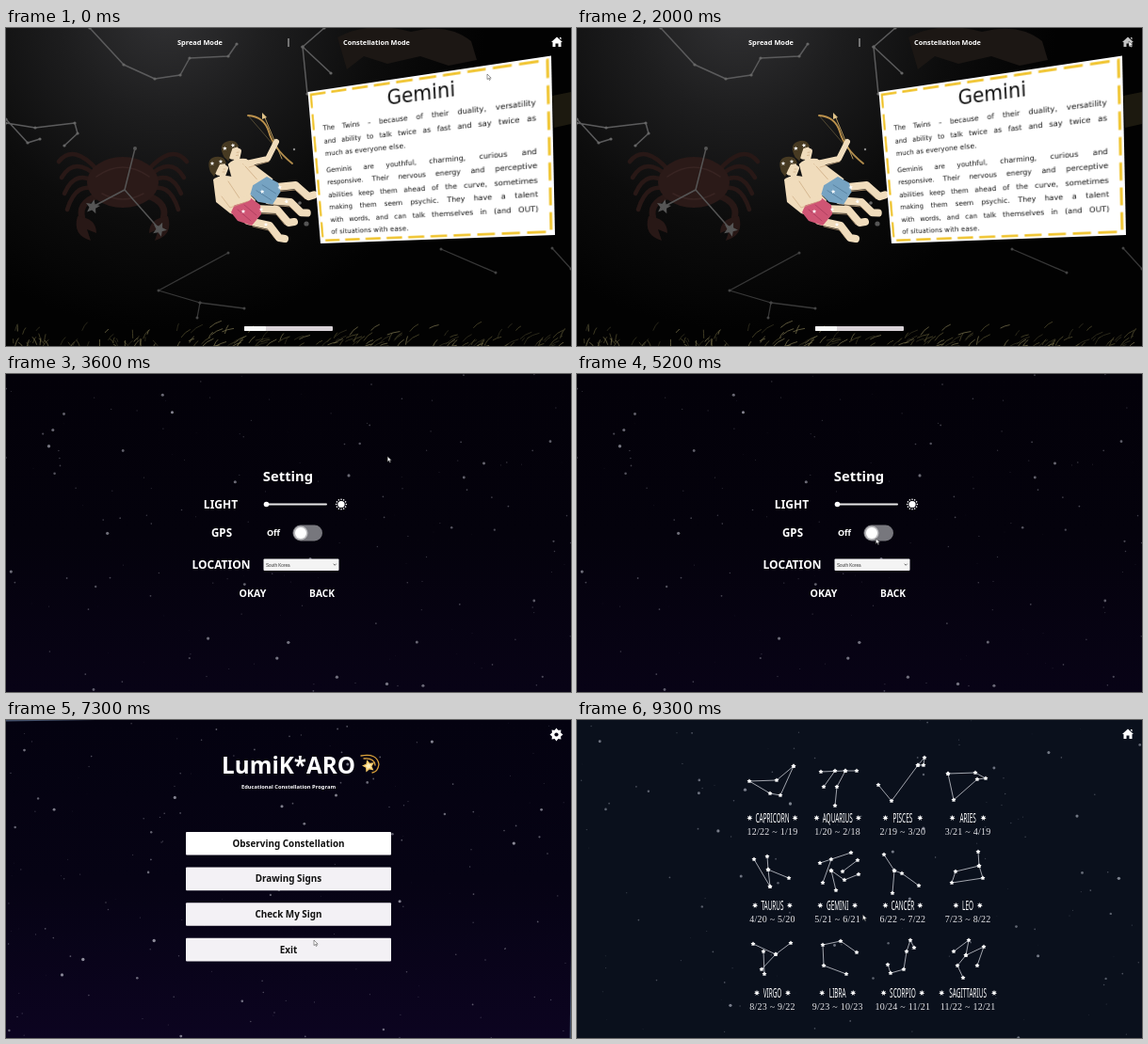
Write an HTML page that moves like this. It is 600 px wide and 338 px high and loops after 9400 ms.

```html
<!DOCTYPE html>
<html lang="en">
<head>
<meta charset="utf-8">
<title>Constellation program</title>
<style>
html, body { margin: 0; width: 100%; height: 100%; overflow: hidden; background: #000; }
#stage { position: absolute; left: 0; top: 0; width: 600px; height: 338px; overflow: hidden; }
svg { position: absolute; left: 0; top: 0; }
text { font-family: "Noto Sans", "Open Sans", sans-serif; text-anchor: middle; fill: #fff; font-weight: 700; }
.label { font-weight: 400; }
.date { font: 10px "Liberation Serif", serif; letter-spacing: .25px; fill: #e4e4e8; }
.small { font: 4.6px "Liberation Sans", sans-serif; fill: #333; text-anchor: start; }
#card { position: absolute; left: 0; top: 0; width: 258px; height: 176px; background: #fff; color: #111;
  font-family: "DejaVu Sans", sans-serif; transform-origin: 0 0; }
#card div { position: absolute; left: 15px; width: 228px; font-size: 7.7px; line-height: 14px; text-align: justify; text-align-last: justify; }
#card div.last { text-align-last: left; letter-spacing: .15px; }
#card div.head { top: 2px; font-size: 20.5px; line-height: 34px; text-align-last: center; }
</style>
</head>
<body>
<div id="stage"></div>
<script>
const LOOP = 9400;
const stage = document.getElementById('stage');
const $ = id => document.getElementById(id);
const clamp = v => Math.max(0, Math.min(1, v));

function rng(seed) {
  return () => (seed = (seed * 16807) % 2147483647) / 2147483647;
}
const text = (s, x, y, size, extra = '') =>
  `<text x="${x}" y="${y}" font-size="${size}" ${extra}>${s}</text>`;
const line = (d, color, width) =>
  `<path d="${d}" fill="none" stroke="${color}" stroke-width="${width}" stroke-linecap="round" stroke-linejoin="round"/>`;
const shape = (d, color) => `<path d="${d}" fill="${color}"/>`;
const dot = (x, y, r, color, o = 1) =>
  `<circle cx="${x}" cy="${y}" r="${r}" fill="${color}" opacity="${o}"/>`;
const oval = (x, y, rx, ry, color) =>
  `<ellipse cx="${x}" cy="${y}" rx="${rx}" ry="${ry}" fill="${color}"/>`;
const box = (x, y, w, h, color, extra = '') =>
  `<rect x="${x}" y="${y}" width="${w}" height="${h}" fill="${color}" ${extra}/>`;
const group = (transform, s) => `<g transform="${transform}">${s}</g>`;

function star(x, y, r, color, n = 5, inner = .45, turn = 0) {
  let p = '';
  for (let i = 0; i < 2 * n; i++) {
    const a = i * Math.PI / n - Math.PI / 2 + turn, q = i % 2 ? r * inner : r;
    p += (x + q * Math.cos(a)).toFixed(2) + ',' + (y + q * Math.sin(a)).toFixed(2) + ' ';
  }
  return `<polygon points="${p}" fill="${color}"/>`;
}

// Draw a mark at every corner of a path
const corners = (d, mark) => d.match(/\d+ \d+/g).map(p => mark(...p.split(' ').map(Number))).join('');

// Many faint specks and a few larger soft stars
function sky(seed, color, many, few) {
  const rand = rng(seed);
  let out = '';
  for (let i = 0; i < many + few; i++) {
    const big = i >= many, v = rand();
    out += dot((rand() * 600).toFixed(1), (rand() * 338).toFixed(1), (big ? 1.1 + v * .6 : .4 + v * .5).toFixed(2),
      color, (big ? .45 + v * .3 : .15 + v * .3).toFixed(2));
  }
  return out;
}

const home = id => `<path id="${id}" fill="#fff" d="M585 9.5L591 15H589.5V20H586.5V16.5H583.5V20H580.5V15H579ZM588 10H589.5V12.5L588 11Z"/>`;

// Card scene
function crab() {
  const red = '#281816';
  let half = line('M26 14Q50 22 42 42', red, 7) + shape('M48 36Q54 56 34 62L38 50 28 54Q28 38 48 36Z', red);
  for (let i = 0; i < 4; i++)
    half += line(`M26 ${i * 7 - 12}Q${52 - i} ${i * 13 - 42} ${68 - i * 3} ${i * 17 - 22}`, red, 4.5);
  const points = 'M92 190L126 172 163 214M126 172L137 128';
  return group('translate(124 164)', half + group('scale(-1 1)', half) + oval(0, 0, 38, 27, '#2b1a18') +
    line('M-28 -6Q0 -26 28 -6M-22 12Q0 24 22 12', '#382422', 1.5)) +
    line(points, '#555', 1.5) + star(92, 190, 8, '#555', 5, .45, .2) + star(163, 214, 8, '#555', 5, .45, .4) + dot(137, 128, 2, '#555');
}

const skin = '#f0dcbc', shade = '#cfae86';
// One seated figure, head at 0,0
function figure(cloth, dark) {
  return line('M37 43L62 44 74 58 80 57M31 56L54 61 64 74 70 75', skin, 8) +
    line('M42 48L61 49 70 60M36 62L53 66 60 75', shade, .7) +
    shape('M-6 12Q2 6 14 9L39 34 30 54 12 48 -3 36Z', skin) +
    shape('M17 38L33 31 44 39 45 49 35 61 20 56 13 47Z', cloth) +
    line('M20 44L34 56M27 39L40 50', dark, .8) +
    line('M4 8L7 0', skin, 6) + oval(1, 0, 7, 8, skin) +
    shape('M-9 4Q-14 -10 -4 -12 6 -14 8 -5L1 -4 -2 2 -5 9Z', '#473a22') +
    line('M5 1H7M4 4H6M10 14L22 32', shade, .8) +
    [[-7, -5], [2, -7], [26, 46], [45, 44], [50, 60]].map(([x, y]) => star(x, y, 2.4, '#fff')).join('');
}
const twins = line('M257 93Q274 94 279 110 284 128 304 144', '#bd924c', 1.8) +
  line('M257 93L289 130 304 144', '#8f7c50', .5) + line('M293 139L274 93', '#c9a766', .9) + shape('M272 90L277 95 272 97Z', '#dfc288') +
  group('translate(240 132) rotate(-8)', figure('#76a3c2', '#557f9e')) +
  line('M255 144L278 139 287 121', skin, 6) + line('M258 148L279 142', shade, .7) +
  group('translate(226 149)', figure('#cf5574', '#a93c5c') + line('M0 20L11 38 31 32', skin, 6) + line('M3 30L12 42 31 35', shade, .7)) +
  dot(312, 186, 1.8, '#666') + dot(319, 208, 2.6, '#555') + dot(306, 129, 1.2, '#888');

const paths = 'M89 0L125 39 158 54 185 50 195 32 236 30 245 17M0 97L23 122 36 118M0 101L31 106 73 101 76 112 62 125M320 70L315 20 338 0M315 20L345 48';
const lowPaths = 'M236 239L162 279 206 292 253 298M206 292L203 308M462 235L520 260M580 234L600 256';
const cardScene = box(0, 0, 600, 338, 'url(#night)') +
  shape('M352 10Q385 -8 430 4 470 -6 494 14L500 34 470 40 440 30 405 38 380 30 362 44Z', '#1c1714') +
  shape('M580 72L600 68V102L582 106Z', '#1c190f') +
  line(paths, '#5b5b5c', 1.5) + corners(paths, (x, y) => dot(x, y, 1.6, '#666')) +
  line(lowPaths, '#383838', 1.3) + corners(lowPaths, (x, y) => dot(x, y, 1.5, '#444')) +
  crab() + twins + '<g id="grass"></g>' +
  box(253, 317, 94, 5, '#d8d2d7', 'rx="1"') + box(253, 317, 23, 5, '#f8f8f8', 'rx="1"') +
  text('Spread Mode', 206, 18, 7.4) + text('Constellation Mode', 393.5, 18, 7.3) +
  box(299.5, 11, 1, 9, '#ccc') + home('home');

// Menu scene
const buttons = ['Observing Constellation', 'Drawing Signs', 'Check My Sign', 'Exit'];
const gear = star(584.5, 15.5, 7, '#fff', 8, .7) + dot(584.5, 15.5, 5, '#fff') + dot(584.5, 15.5, 2.1, '#0a0716');
const menuScene = box(0, 0, 600, 338, 'url(#violet)') + sky(77, '#bdbdc9', 150, 34) +
  shape('M0 0H95L0 1.4ZM600 245V338H598.6Z', '#43506a') +
  text('LumiK*ARO', 300, 56.5, 24.2) + text('Educational Constellation Program', 300, 72.5, 5.75, 'style="font-weight:600"') +
  line('M377 38Q394 35 396 47 395 55 389 56M380 41Q391 40 392 48', '#d9a13b', 1.3) +
  star(385, 49, 7, '#f4c867', 5, .5, -.25) + star(385, 49, 3.8, '#fff0bd', 5, .5, -.25) +
  buttons.map((s, i) => box(191, 119 + i * 37.6, 218, 24.6, i ? '#f3f1f5' : '#fff', `rx="1" id="btn${i}"`) +
    text(s, 300, 134.8 + i * 37.6, 9.9, 'style="fill:#111"')).join('') + gear;

// Settings scene
let sun = dot(356, 138.5, 3.6, '#fff');
for (let i = 0; i < 12; i++)
  sun += group(`rotate(${i * 30} 356 138.5)`, dot(361.3, 138.5, .8, '#fff'));
const setScene = box(0, 0, 600, 338, 'url(#violet2)') + sky(4242, '#9c9ca8', 140, 34) +
  text('Setting', 299.5, 113.5, 14.8) + text('LIGHT', 228, 142.5, 12) + text('GPS', 229, 173, 11.6) +
  text('LOCATION', 228.5, 207, 12) + text('Off', 284, 172, 9) +
  text('OKAY', 262, 237, 10.6) + text('BACK', 335.5, 237, 10.2) +
  box(276, 137.5, 65, 2, '#e6e6e6', 'rx="1"') + dot(276.5, 138.5, 2.8, '#fff') + sun +
  box(304.5, 160.5, 31.5, 17, '#77777d', 'rx="8.5"') + dot(313, 169, 7.6, '#fff', .5) + dot(313, 169, 6, '#fff') +
  box(273.5, 196.5, 80, 12.5, '#f4f4f4', 'rx="1"') + text('South Korea', 276, 204.5, 4.6, 'class="small"') +
  line('M348 202L349.2 203.3 350.4 202', '#333', .7) +
  '<g id="list">' + box(273.5, 209, 80, 20.5, '#f0f0f0') + text('South Korea', 283, 220.5, 4.6, 'class="small"') + '</g>';

// Signs: name, dates, key points
const signs = [
  ['CAPRICORN', '12/22 ~ 1/19', 'M230 49L212 64 183 65 205 78 216 80 230 49'],
  ['AQUARIUS', '1/20 ~ 2/18', 'M297 54L285 54 259 55M274 54L262 71M285 54L276 71 274 91'],
  ['PISCES', '2/19 ~ 3/20', 'M362 48L369 40 368 48 362 48 334 86 320 69'],
  ['ARIES', '3/21 ~ 4/19', 'M394 57L423 56 434 62 425 63 400 85 394 57'],
  ['TAURUS', '4/20 ~ 5/20', 'M188 148L205 177M202 145L203 159 225 168M203 159L205 177'],
  ['GEMINI', '5/21 ~ 6/21', 'M258 152L291 141M270 148L261 173M270 160L284 170 299 164M282 161L298 149M270 160L275 181'],
  ['CANCER', '6/22 ~ 7/22', 'M326 143L337 160 345 163 363 176M337 160L335 184'],
  ['LEO', '7/23 ~ 8/22', 'M426 140L427 155 402 161 398 173 431 168 427 155'],
  ['VIRGO', '8/23 ~ 9/22', 'M187 238L211 249 227 237M211 249L196 265M198 246L199 270'],
  ['LIBRA', '9/23 ~ 10/23', 'M297 247L280 235 261 239 262 261 286 270'],
  ['SCORPIO', '10/24 ~ 11/21', 'M358 242L354 234 350 246 347 265 333 269 330 260'],
  ['SAGITTARIUS', '11/22 ~ 12/21', 'M400 246L416 234 413 250 432 241 425 261M413 250L404 261 410 274']
];
const signScene = box(0, 0, 600, 338, '#0a101c') + sky(991, '#a6abb8', 110, 30) +
  signs.map(([name, dates, d], i) => {
    const x = 207.5 + (i % 4) * 69.2, y = 104 + Math.floor(i / 4) * 93, span = 7 + 1.9 * name.length;
    return line(d, '#c9ccd4', .8) + corners(d, (a, b) => star(a, b, 2.6, '#fff', 5, .55)) +
      group(`translate(${x} ${y + 4.5}) scale(.46 1)`, text(name, 0, 0, 14, 'class="label"')) +
      star(x - span, y, 3.2, '#fff', 7) + star(x + span, y, 3.2, '#fff', 7) +
      text(dates, x, y + 17.5, 10, 'class="date"');
  }).join('') + home('home2');

const stops = c => c.map((v, i) => `<stop offset="${i / (c.length - 1)}" stop-color="${v}"/>`).join('');
const grad = (id, ...c) => `<linearGradient id="${id}" x2="0" y2="1">${stops(c)}</linearGradient>`;
stage.innerHTML = '<svg width="600" height="338"><defs>' +
  `<radialGradient id="night" gradientUnits="userSpaceOnUse" cx="170" cy="-20" r="340">${stops(['#323234', '#1d1d1e', '#0c0c0c', '#020202'])}</radialGradient>` +
  grad('violet', '#040210', '#060314', '#0c0420') + grad('violet2', '#030109', '#04020c', '#080316') + '</defs>' +
  [cardScene, menuScene, setScene, signScene].map((s, i) => `<g id="scene${i}">${s}</g>`).join('') + '</svg><div id="card"></div>' +
  '<svg width="600" height="338"><path id="cursor" d="M0 0V5.6L1.4 4.4 2.4 6.5 3.3 6 2.4 4.1H4.2Z" fill="#fff" stroke="#333" stroke-width=".5"/></svg>';

// Card text laid flat, then mapped onto its tilted corners
const lines = [
  'The Twins – because of their duality, versatility', 'and ability to talk twice as fast and say twice as', 'much as everyone else.',
  'Geminis are youthful, charming, curious and', 'responsive. Their nervous energy and perceptive', 'abilities keep them ahead of the curve, sometimes',
  'making them seem psychic. They have a talent', 'with words, and can talk themselves in (and OUT)', 'of situations with ease.'
];
const card = $('card');
card.innerHTML = '<svg width="258" height="176"><rect x="3.5" y="3.5" width="251" height="169" fill="none" stroke="#efc020" stroke-width="2.4" stroke-dasharray="18 7"/></svg>' +
  '<div class="head">Gemini</div>' +
  lines.map((s, i) => `<div class="${s.endsWith('se.') ? 'last' : ''}" style="top:${36 + i * 14.5 + (i > 2 ? 4 : 0)}px">${s}</div>`).join('');

function quad(w, h, [x0, y0], [x1, y1], [x2, y2], [x3, y3]) {
  const ax = x1 - x2, ay = y1 - y2, bx = x3 - x2, by = y3 - y2;
  const sx = x0 - x1 + x2 - x3, sy = y0 - y1 + y2 - y3, den = ax * by - bx * ay;
  const g = (sx * by - bx * sy) / den, k = (ax * sy - sx * ay) / den;
  return 'matrix3d(' + [
    (x1 - x0 + g * x1) / w, (y1 - y0 + g * y1) / w, 0, g / w,
    (x3 - x0 + k * x3) / h, (y3 - y0 + k * y3) / h, 0, k / h,
    0, 0, 1, 0, x0, y0, 0, 1].map(v => v.toFixed(9)).join() + ')';
}
card.style.transform = quad(258, 176, [320.5, 68], [579, 29.5], [583, 220], [334, 229]);

// Windswept grass, steeper on the left
const rand = rng(31);
const blades = Array.from({ length: 170 }, (_, i) => {
  const x = rand() * 610 - 5;
  return { x, y: 340 - rand() * rand() * 24, h: 2 + rand() * 7, lean: 2 + rand() * 11 - (x < 170 ? 7 : 0), p: rand() * 6.28, c: i % 3 };
});
function grass(t) {
  const d = ['', '', ''];
  for (const b of blades) {
    const tip = b.lean + Math.sin(t / 1000 * Math.PI + b.p);
    d[b.c] += `M${b.x.toFixed(1)} ${b.y.toFixed(1)}q${(tip * .4).toFixed(1)} ${(-b.h * .7).toFixed(1)} ${tip.toFixed(1)} ${(-b.h).toFixed(1)}`;
  }
  return ['#4f4a2c', '#706a48', '#343220'].map((c, i) => line(d[i], c, .8)).join('');
}

// Pointer stops: time, x, y
const route = [
  [200, 511, 49], [1600, 586, 14], [3000, 586, 14], [3600, 405.5, 87.5], [3900, 316, 126], [4600, 287, 168],
  [5100, 321, 169], [5700, 299.5, 204], [6300, 299.5, 204], [6900, 327, 234], [7400, 327, 234], [8100, 303.5, 207]
];
function pointer(t) {
  const i = route.findIndex(p => p[0] > t);
  if (i <= 0) return route.at(i).slice(1);
  const [t0, x0, y0] = route[i - 1], [t1, x1, y1] = route[i];
  const k = (t - t0) / (t1 - t0);
  return [x0 + (x1 - x0) * k, y0 + (y1 - y0) * k];
}

function draw(t) {
  const now = t < 2100 ? 0 : t < 3000 ? 1 : t < 7300 ? 2 : t < 8400 ? 1 : 3;
  for (let i = 0; i < 4; i++) $('scene' + i).style.display = i === now ? '' : 'none';
  card.style.display = now ? 'none' : '';
  if (now === 0) $('grass').innerHTML = grass(t);
  $('home').setAttribute('fill', t > 1500 ? '#c4c4c4' : '#fff');
  $('list').setAttribute('opacity', clamp((t - 5850) / 150) * clamp((6340 - t) / 150));
  $('btn2').setAttribute('fill', t >= 8200 ? '#bcbcbc' : '#f3f1f5');
  $('cursor').setAttribute('transform', `translate(${pointer(t).map(v => v.toFixed(2)).join(' ')})`);
}
const start = performance.now();
function tick() {
  draw((performance.now() - start) % LOOP);
  requestAnimationFrame(tick);
}
tick();
</script>
</body>
</html>
```
